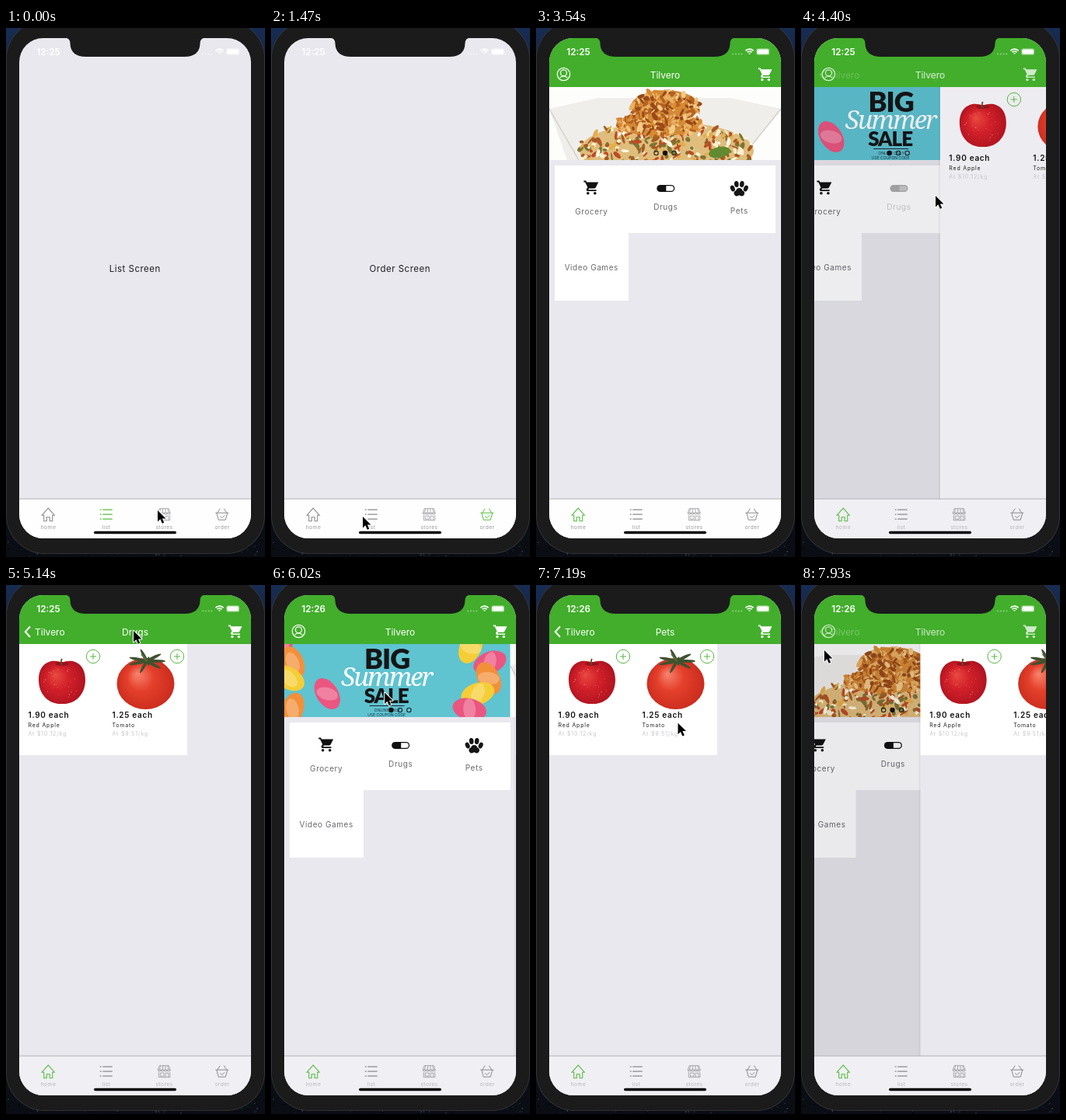
Recreate the animation shown at these times as an HTML page with a canvas. Size 333 by 681 pixels, loop 8 s.

```html
<!DOCTYPE html>
<html lang="en">
<head>
<meta charset="utf-8">
<title>Shopping app</title>
<style>
html, body { margin: 0; width: 100%; height: 100%; overflow: hidden; background: #0c1220; }
canvas { display: block; width: 100vw; height: 100vh; }
</style>
</head>
<body>
<canvas id="stage"></canvas>
<script>
const W = 333, H = 681, LOOP = 8000, STEP = 146.8;
const LEFT = 17, WIDTH = 298, TOP = 76, BOTTOM = 606;
const GREEN = '#42ae2b', BG = '#e9e8ee', BRAND = 'Tilvero';
const canvas = document.getElementById('stage');
const ctx = canvas.getContext('2d');
const dpr = window.devicePixelRatio || 1;
canvas.width = W * dpr;
canvas.height = H * dpr;

// time, x, y where the pointer pauses or turns
const POINTER = [
  [0, 195, 621], [780, 270, 628], [1468, 118, 629], [1800, 56, 627], [2340, 190, 125],
  [3090, 110, 125], [3900, 172, 140], [4404, 173, 216], [5138, 164, 59], [5500, 45, 62],
  [6600, 266, 229], [6800, 266, 229], [7780, 30, 84]
];

const clamp = v => Math.max(0, Math.min(1, v));
const span = (t, a, b) => clamp((t - a) / (b - a));
const smooth = v => v * v * (3 - 2 * v);

// cubic-bezier(.35, .45, 0, 1) over half a second
function slide(t, start) {
  const x = span(t, start, start + 500);
  let lo = 0, hi = 1, u = 0;
  for (let i = 0; i < 24; i++) {
    u = (lo + hi) / 2;
    if (1.05 * u * (1 - u) ** 2 + u ** 3 < x) lo = u; else hi = u;
  }
  return 1.35 * u * (1 - u) ** 2 + 3 * u * u * (1 - u) + u ** 3;
}

function along(keys, t) {
  let i = 0;
  while (i < keys.length - 2 && keys[i + 1][0] <= t) i++;
  const [a, ax, ay] = keys[i], [b, bx, by] = keys[i + 1];
  const k = smooth(span(t, a, b));
  return [ax + (bx - ax) * k, ay + (by - ay) * k];
}

function seeded(seed) {
  return () => (seed = (seed * 16807) % 2147483647) / 2147483647;
}

function rect(x, y, w, h, fill) {
  ctx.fillStyle = fill;
  ctx.fillRect(x, y, w, h);
}

function round(x, y, w, h, r, fill) {
  ctx.beginPath();
  ctx.roundRect(x, y, w, h, r);
  ctx.fillStyle = fill;
  ctx.fill();
}

function oval(x, y, rx, ry, fill, turn = 0) {
  ctx.beginPath();
  ctx.ellipse(x, y, rx, ry, turn, 0, Math.PI * 2);
  ctx.fillStyle = fill;
  ctx.fill();
}

function lines(d, color, width = 1) {
  ctx.strokeStyle = color;
  ctx.lineWidth = width;
  ctx.stroke(typeof d === 'string' ? new Path2D(d) : d);
}

function ring(x, y, r, color, width = 1, from = 0, to = Math.PI * 2) {
  const path = new Path2D();
  path.arc(x, y, r, from, to);
  lines(path, color, width);
}

function shape(d, fill) {
  ctx.fillStyle = fill;
  ctx.fill(new Path2D(d));
}

function text(s, x, y, size, color, { weight = 400, gap = 0, align = 'left', font = 'Inter, sans-serif' } = {}) {
  ctx.font = `${weight} ${size}px ${font}`;
  ctx.letterSpacing = gap + 'px';
  ctx.textAlign = align;
  ctx.fillStyle = color;
  ctx.fillText(s, x + (align === 'center' ? gap / 2 : 0), y);
}

function layer(draw, { x = 0, y = 0, scale = 1, alpha = 1 } = {}) {
  ctx.save();
  ctx.translate(x, y);
  ctx.scale(scale, scale);
  ctx.globalAlpha *= alpha;
  draw();
  ctx.restore();
}

function clip(x, y, w, h, r, draw) {
  ctx.save();
  ctx.beginPath();
  ctx.roundRect(x, y, w, h, r);
  ctx.clip();
  draw();
  ctx.restore();
}

// scatters small dabs of colour inside an ellipse
function dabs(count, x, y, rx, ry, size, tones, rnd) {
  for (let i = 0; i < count; i++) {
    const a = rnd() * 6.28, d = Math.sqrt(rnd());
    const tone = tones[Math.floor(rnd() * tones.length)];
    oval(x + Math.cos(a) * d * rx, y + Math.sin(a) * d * ry, size * (0.3 + rnd()), size * (0.2 + rnd() * 0.4), tone, rnd() * 3);
  }
}

function cart(x, y, scale, color) {
  layer(() => {
    shape('M1 2H4.300L5.200 4H22L18 12Q17 13 16 13H8.500L7.400 15H19V17H6Q4 16 5 13.500L6.600 11.600 3 4H1Z', color);
    oval(7, 20, 2, 2, color);
    oval(17, 20, 2, 2, color);
  }, { x, y, scale });
}

function saleBanner() {
  rect(LEFT, TOP, WIDTH, 94, '#5fc3d0');
  const rnd = seeded(5);
  for (let i = 0; i < 10; i++) {
    const x = (i % 2 ? 245 : 20) + rnd() * 65, y = 80 + (i >> 1) * 20;
    const tone = ['#ea5680', '#f5cd36', '#f2903a'][i % 3];
    oval(x, y, 22, 14, tone, rnd() * 3);
    oval(x, y, 14, 8, 'rgba(255,255,255,.25)', rnd() * 3);
  }
  const mid = { align: 'center' }, heavy = { ...mid, weight: 900, font: 'Lato, sans-serif', gap: -1 };
  text('BIG', 157, 108, 36, '#151515', heavy);
  text('Summer', 157, 130, 33, '#fff', { ...mid, weight: 'italic 400', font: '"Noto Serif", serif', gap: -2 });
  text('SALE', 156, 152, 26, '#151515', heavy);
  rect(134, 155, 45, 1, '#223');
  text('ONLINE ONLY', 157, 163, 5, '#1b3440', mid);
  text('USE COUPON CODE', 156, 169, 5, '#1b3440', mid);
}

function foodBanner() {
  rect(LEFT, TOP, WIDTH, 94, '#fdfdfc');
  shape('M17 104 80 90H250L315 104 262 170H40Z', '#f0eeea');
  lines('M17 104 55 170M315 104 262 170', '#d2d0cb', 1.5);
  const rnd = seeded(71);
  oval(168, 158, 112, 37, '#dfbd7c');
  dabs(330, 168, 156, 114, 38, 5, ['#f8efcf', '#bd4c25', '#e5ad4d', '#7d7434', '#fff7e4', '#a85a24'], rnd);
  for (const [x, y, rx, ry] of [[158, 124, 55, 15], [166, 101, 44, 21]]) {
    oval(x, y, rx, ry, '#d28a38');
    dabs(170, x, y, rx, ry, 5, ['#e8b063', '#b8621f', '#f2ca88', '#d98a31', '#97491a'], rnd);
  }
  oval(236, 160, 14, 7, '#628a30', -0.2);
}

function paw(x, y) {
  for (const side of [-1, 1]) {
    oval(x + side * 8.5, y, 2.8, 4, '#151515', side * 0.4);
    oval(x + side * 3.5, y - 5.5, 2.8, 4, '#151515', side * 0.1);
    oval(x + side * 2.6, y + 6, 4.2, 3.6, '#151515', side * 0.5);
  }
  oval(x, y + 3.5, 4, 4, '#151515');
}

function pill(x, y) {
  round(x - 11.5, y - 4.5, 23, 9, 4.5, '#111');
  round(x + 0.5, y - 3.2, 9.7, 6.4, [0, 3.2, 3.2, 0], '#fff');
}

function home(page, pressed) {
  rect(LEFT, TOP, WIDTH, BOTTOM - TOP, BG);
  clip(LEFT, TOP, WIDTH, 94, 0, () => {
    layer(saleBanner, { x: -WIDTH * page });
    if (page > 0) layer(foodBanner, { x: WIDTH * (1 - page) });
  });
  for (let i = 0; i < 3; i++) {
    const x = 154.5 + i * 11.5;
    if (i === Math.round(page)) oval(x, 161, 3.2, 3.2, '#111');
    else ring(x, 161, 2.7, '#222', 1.1);
  }
  rect(24, 177, 284, 87, '#fff');
  rect(24, 264, 95, 87, '#fff');
  const cell = (name, x, y, icon) => layer(() => {
    if (icon) icon();
    text(name, x, y, 10, '#69696d', { gap: 0.57, align: 'center' });
  }, { alpha: pressed === name ? 0.35 : 1 });
  cell('Grocery', 71, 240, () => cart(60.5, 194.8, 0.9, '#111'));
  cell('Drugs', 166.5, 234, () => pill(166.8, 206.5));
  cell('Pets', 261, 239, () => paw(261.3, 206.5));
  cell('Video Games', 71, 311.5);
}

function ball(x, y, r, light, base, edge) {
  const g = ctx.createRadialGradient(x - r * 0.3, y - r * 0.35, 1, x, y, r * 1.15);
  g.addColorStop(0, light);
  g.addColorStop(0.4, base);
  g.addColorStop(1, edge);
  return g;
}

function apple() {
  shape('M72 100C60 94 42 99 42 122 42 142 56 154 72 153 88 154 102 142 102 122 102 99 84 94 72 100Z',
    ball(72, 126, 30, '#e8483f', '#d2202a', '#a9121e'));
  oval(72, 101.5, 9, 2.5, '#93141f');
  lines('M71.500 103Q70 98 72 95', '#6a4a22', 1.8);
  dabs(35, 72, 125, 26, 22, 0.8, ['#ee8d7c'], seeded(9));
}

function tomato() {
  oval(179.5, 127, 37, 33, ball(179.5, 127, 36, '#f7806a', '#e4402c', '#c6281b'));
  for (let i = 0; i < 7; i++) {
    const a = i * 0.9;
    oval(181 + Math.cos(a) * 12, 98 + Math.sin(a) * 5, 12, 2, '#3f5230', Math.atan2(Math.sin(a) * 5, Math.cos(a) * 12));
  }
  lines('M181 98Q176 91 174 89', '#56703a', 2);
}

function product(x, price, name, rate) {
  ring(x + 95, 92, 8.7, '#54b840');
  lines(`M${x + 91} 92h8M${x + 95} 88v8`, '#54b840');
  text(price, x + 11.5, 171, 10, '#111', { weight: 600, gap: 0.7 });
  text(name, x + 11.5, 183, 7, '#222', { gap: 0.8 });
  text(rate, x + 11.5, 194, 7, '#c6c5ca', { gap: 0.85 });
}

function shop(loaded) {
  rect(LEFT, TOP, WIDTH, BOTTOM - TOP, loaded ? BG : '#edecf0');
  if (loaded) rect(LEFT, TOP, 216, 143, '#fff');
  apple();
  product(17, '1.90 each', 'Red Apple', 'At $10.12/kg');
  tomato();
  product(125, '1.25 each', 'Tomato', 'At $9.51/kg');
}

function profile(x, y) {
  ring(x, y, 8.2, '#fff', 1.2);
  ring(x, y - 1.7, 4, '#fff', 1.2);
  ring(x, y + 9, 6.5, '#fff', 1.2, -2.4, -0.74);
}

function header(p, title) {
  rect(LEFT, 13, WIDTH, 63, GREEN);
  const q = p * p, mid = { align: 'center' };
  layer(() => {
    profile(35.5, 59.5);
    text(BRAND, 166, 64.5, 12, '#fff', mid);
  }, { alpha: 1 - q });
  layer(() => {
    lines('M31 53.500 24.800 60.300 31 67', '#fff', 2);
    text(BRAND, 37, 64.5, 12, '#fff');
  }, { alpha: q });
  layer(() => text(title, 166, 64.5, 12, '#fff', mid), { alpha: p ** 3 });
  layer(() => cart(285, 49.8, 0.84, '#fff'), { alpha: 1 - 0.25 * Math.sin(Math.PI * p) });
}

function status(clock) {
  const faint = 'rgba(255,255,255,.4)';
  text(clock, 39.3, 35, 11.7, '#fff', { weight: 600 });
  for (let i = 0; i < 4; i++) oval(253.2 + i * 3.7, 33.5, 1.1, 1.1, faint);
  for (const r of [1, 4, 6.8]) ring(274.5, 34, r, '#fff', 1.7, -2.4, -0.74);
  round(283.2, 26.2, 17, 8.6, 2.6, faint);
  round(284.4, 27.4, 14.6, 6.2, 1.6, '#fff');
}

// each icon is drawn around its own centre
const TABS = {
  home: c => lines('M-8 1 0-8 8 1H5.500V8.500H2V3.500H-2V8.500H-5.500V1Z', c, 1.1),
  list: c => {
    for (const y of [-6, 0, 6]) lines(`M-8 ${y}h2M-4.500 ${y}H8`, c, 1.2);
  },
  stores: c => {
    lines('M-6-7.500H6L8-2H-8ZM-7 1V7.500H7.500V1M-5 2H0V6H-5ZM2 7.500V2H5.500V7.500', c, 0.7);
    for (let x = -6; x <= 6; x += 4) {
      lines(`M${x * 0.75}-7.500 ${x}-2`, c, 0.7);
      ring(x, -2, 2, c, 0.7, 0, Math.PI);
    }
  },
  order: c => lines('M-8.500-2H8.500M-7-2-4.500 7H4.500L7-2M-6-2-2.500-7.500M6-2 2.500-7.500M-2.500 2.300 0 4.500 3.500 1', c)
};

function tabBar(active, tinted) {
  rect(LEFT, BOTTOM, WIDTH, 51, tinted ? '#f0eff3' : '#fefefe');
  rect(LEFT, BOTTOM - 0.3, WIDTH, 1, '#b4b3b9');
  Object.entries(TABS).forEach(([name, icon], i) => {
    const x = LEFT + WIDTH / 8 * (2 * i + 1);
    layer(() => icon(name === active ? '#55bd40' : '#8a8a8f'), { x, y: 626.2 });
    text(name, x, 644.5, 6.7, tinted ? '#b5b4b9' : '#98989c', { gap: 0.45, align: 'center' });
  });
  round(113, 647.7, 106, 3.6, 1.8, '#050505');
}

function phone() {
  const g = ctx.createLinearGradient(0, 0, 0, H);
  g.addColorStop(0, '#172c52');
  g.addColorStop(0.2, '#111d36');
  g.addColorStop(1, '#0a0d13');
  rect(0, 0, W, H, g);
  dabs(260, W / 2, 664, W * 0.6, 24, 1.6, ['#2c3947', '#141d28', '#3b4652', '#050608'], seeded(33));
  round(0, -10, 333, 687, 50, '#3a3b3e');
  round(0.8, -9.2, 331.4, 685.4, 49, '#1b1b1c');
}

function pointer(x, y) {
  layer(() => {
    const d = 'M0 0V14.500L3.400 11.300 5.800 16.800 8.300 15.700 5.900 10.400H10.500Z';
    ctx.lineJoin = 'round';
    lines(d, '#fff', 2);
    shape(d, '#000');
  }, { x, y });
}

function homeStack(p, page, pressed, loaded) {
  const edge = LEFT + WIDTH * (1 - p);
  layer(() => home(page, pressed), { x: -0.3 * WIDTH * p });
  if (p <= 0) return;
  rect(LEFT, TOP, WIDTH, BOTTOM - TOP, `rgba(0,0,30,${0.155 * p})`);
  rect(edge - 2, TOP, 2, BOTTOM - TOP, 'rgba(0,0,0,.05)');
  layer(() => shop(loaded), { x: edge - LEFT });
}

function draw(t) {
  const tab = t < 300 ? 'list' : t < 800 ? 'stores' : t < 1850 ? 'order' : 'home';
  const title = t < 6200 ? 'Drugs' : 'Pets';
  const p = slide(t, 4308) - slide(t, 5560) + slide(t, 6675) - slide(t, 7831);
  const page = smooth(span(t, 2790, 3100)) - smooth(span(t, 3640, 3880)) + smooth(span(t, 5990, 6300));
  const pressed = t > 4100 && t < 4600 ? 'Drugs' : t > 6560 && t < 6900 ? 'Pets' : '';

  ctx.setTransform(canvas.width / W, 0, 0, canvas.height / H, 0, 0);
  phone();
  clip(LEFT, 13, WIDTH, 644, 31, () => {
    rect(LEFT, 13, WIDTH, 644, BG);
    if (tab === 'home') {
      homeStack(p, page, pressed, t > 4500);
      header(p, title);
    } else {
      const name = tab[0].toUpperCase() + tab.slice(1);
      text(name + ' Screen', 165.5, 314, 11.5, '#1d1d1f', { gap: 0.5, align: 'center' });
    }
    status(t < 5400 ? '12:25' : '12:26');
    tabBar(tab, t > 3600);
  });
  shape('M76 12.500Q82.500 13 82.500 20 83 37 103 37H229Q249 37 249.500 20 249.500 13 256 12.500Z', '#1b1b1c');
  if (t < 3100 || t > 3640) pointer(...along(POINTER, t));
}

// The picture advances in even steps, like a screen recording.
function tick(now) {
  const t = now % LOOP;
  draw(Math.floor((t + 20) / STEP) * STEP);
  requestAnimationFrame(tick);
}
draw(0);
requestAnimationFrame(tick);
</script>
</body>
</html>
```
